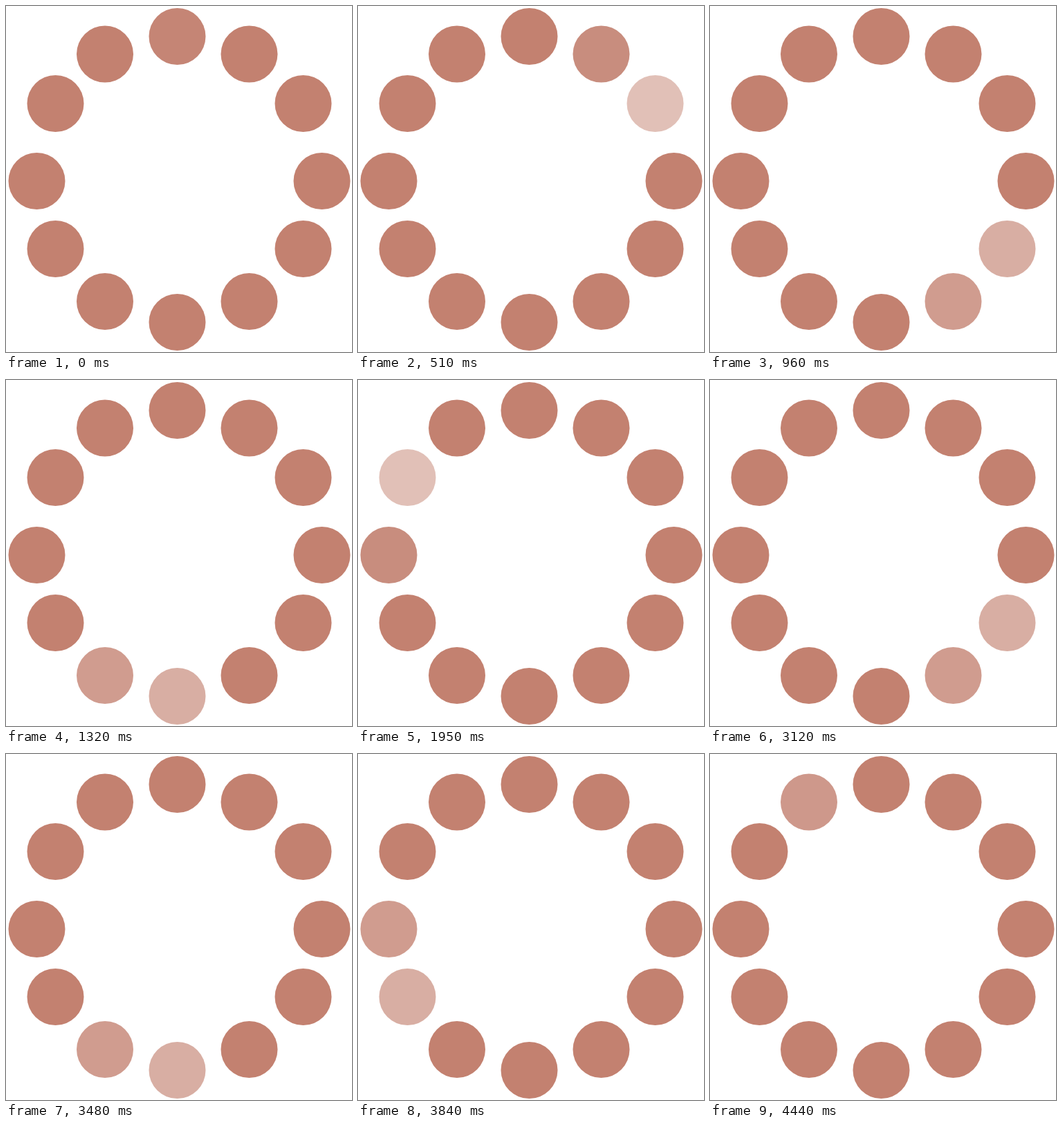
Write an HTML page that moves like this. It is 500x500 px and loops after 4.5 s.

```html
<!DOCTYPE html>
<html lang="en">
<head>
<meta charset="utf-8">
<title>Ring of dots</title>
<style>
  html, body { margin: 0; width: 100%; height: 100%; overflow: hidden; background: #fff; }
  svg { display: block; width: 100%; height: 100%; }
  circle { fill: #c38170; }
</style>
</head>
<body>
<svg id="ring" viewBox="0 0 500 500"></svg>
<script>
  const LOOP = 4500, START = 240, BEAT = 180, LAST = 23;
  const FADE_IN = [0.22, 0.36, 0.5];
  const FADE_OUT = [0.36, 0.23, 0.1];
  const centers = [
    [247.5, 44], [351.5, 69.5], [429.5, 141], [456.5, 253],
    [429.5, 351], [351.5, 427], [247.5, 457], [143, 427],
    [71.5, 351], [44.5, 253], [71.5, 141], [143, 69.5]
  ];

  const ring = document.getElementById('ring');
  const dots = centers.map(([x, y]) => {
    const dot = document.createElementNS('http://www.w3.org/2000/svg', 'circle');
    dot.setAttribute('cx', x);
    dot.setAttribute('cy', y);
    dot.setAttribute('r', 41);
    return ring.appendChild(dot);
  });

  // How far each dot has faded, as [index, amount] pairs.
  function fades(t) {
    if (t < START) return [[0, Math.min(0.5, 0.035 + 0.155 * Math.floor(t / 30))]];
    const beat = Math.floor((t - START) / BEAT);
    const phase = (t - START) % BEAT;
    const here = beat % 12;
    if (beat === LAST) return [[here, phase < 60 ? 0.36 : 0.19]];
    const step = phase < 30 ? 0 : phase < 90 ? 1 : 2;
    return [[here, FADE_OUT[step]], [(here + 1) % 12, FADE_IN[step]]];
  }

  function draw(t) {
    const opacity = dots.map(() => 1);
    for (const [i, amount] of fades(t)) opacity[i] = 1 - amount;
    dots.forEach((dot, i) => dot.setAttribute('opacity', opacity[i]));
  }

  const begin = performance.now();
  function tick() {
    draw((performance.now() - begin) % LOOP);
    requestAnimationFrame(tick);
  }
  tick();
</script>
</body>
</html>
```
